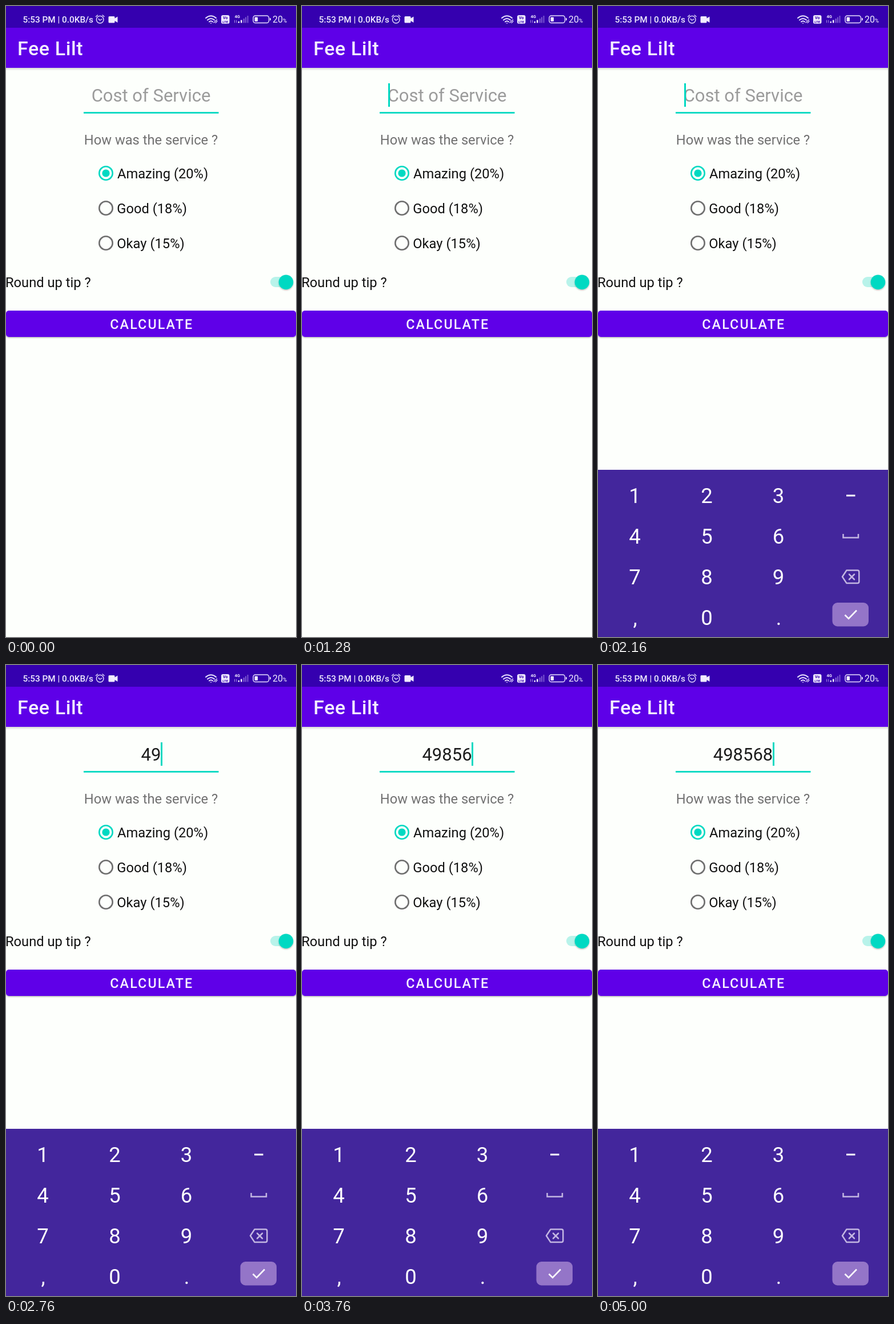
An HTML page that plays this animation: 508x1102 px, repeating every 5040 ms.

```html
<!DOCTYPE html>
<html lang="en">
<head>
<meta charset="utf-8">
<title>Tip calculator</title>
<style>
  :root { --teal: #00d9c2; --violet: #5e00e8; --loop: 5040ms; }
  html, body { margin: 0; width: 100%; height: 100%; overflow: hidden; background: #fdfffc; }
  body { position: relative; font-family: Roboto, sans-serif; }
  svg { position: absolute; left: 0; top: 0; display: block; }
  .label { font-size: 23.7px; fill: #111; }
  .keys { font-size: 36.5px; fill: #fff; text-anchor: middle; }
  .line { fill: none; stroke-linecap: round; stroke-linejoin: round; }

  .field { font-size: 31px; line-height: 40px; white-space: nowrap; }
  .hint, .typed { position: absolute; left: 254px; top: 136.5px; transform: translateX(-50%); }
  .hint { color: #9b9b9b; animation: hint var(--loop) step-end infinite; }
  .typed { color: #1c1c1c; overflow: hidden; animation: type var(--loop) step-end infinite; }
  .caret {
    position: absolute; top: 135px; width: 2.6px; height: 41px; background: var(--teal);
    animation: move var(--loop) step-end infinite, blink var(--loop) step-end infinite;
  }
  .keyboard { animation: slide var(--loop) infinite; }

  @keyframes hint {
    from { visibility: visible; }
    46.03%, to { visibility: hidden; }
  }
  @keyframes type {
    from { width: 0; }
    46.03% { width: 1ch; }
    52.38% { width: 2ch; }
    59.52% { width: 3ch; }
    65.87% { width: 4ch; }
    72.22% { width: 5ch; }
    78.57%, to { width: 6ch; }
  }
  @keyframes move {
    from { left: 151.4px; }
    46.03% { left: calc(253.4px + .5ch); }
    52.38% { left: calc(253.4px + 1ch); }
    59.52% { left: calc(253.4px + 1.5ch); }
    65.87% { left: calc(253.4px + 2ch); }
    72.22% { left: calc(253.4px + 2.5ch); }
    78.57%, to { left: calc(253.4px + 3ch); }
  }
  @keyframes blink {
    from, 27.78%, 88.49% { opacity: 0; }
    18.25%, 37.7%, 98.41%, to { opacity: 1; }
  }
  @keyframes slide {
    from, 26.19% { transform: translateY(292px); animation-timing-function: cubic-bezier(.33, 1, .68, 1); }
    29.76%, to { transform: none; }
  }
</style>
</head>
<body>
<svg width="508" height="1102" viewBox="0 0 508 1102">
  <defs>
    <linearGradient id="shade" x2="0" y2="1">
      <stop stop-color="#000" stop-opacity=".16"/>
      <stop offset="1" stop-color="#000" stop-opacity="0"/>
    </linearGradient>
    <filter id="soft" x="-30%" y="-30%" width="160%" height="160%">
      <feDropShadow dx="0" dy="1.3" stdDeviation="1.3" flood-opacity=".3"/>
    </filter>
  </defs>

  <!-- app bar -->
  <rect y="108" width="508" height="5" fill="url(#shade)"/>
  <rect y="38" width="508" height="70" fill="var(--violet)"/>
  <text x="20" y="86" font-size="34" font-weight="500" letter-spacing=".6" fill="#f5f0ff">Fee Lilt</text>

  <!-- status bar -->
  <rect width="508" height="38" fill="#3500af"/>
  <g fill="#f1ecff">
    <text x="29.5" y="28.7" font-size="15.3" font-weight="500">5:53 PM | 0.0KB/s</text>
    <path d="M181 18h8q1.500 0 1.500 1.500v2l5-3v10.500l-5-3v2q0 1.500-1.500 1.500h-8q-1.500 0-1.500-1.500v-8.500q0-1.500 1.500-1.500z"/>
    <rect x="377" y="16" width="14.500" height="15" rx="3"/>
    <text x="400.500" y="21" font-size="7.500" font-weight="700">4G</text>
    <path d="M406.500 27h2.500v2.500h-2.500zM411 24.500h2.500v5H411z"/>
    <rect x="435.500" y="19.500" width="5.500" height="7.500" rx="1"/>
    <path d="M462 20.500q2 0 2 2.500t-2 2.500z"/>
    <text x="467" y="29" font-size="16">20<tspan font-size="9.500" font-weight="500">%</tspan></text>
  </g>
  <path d="M415.500 22h2.500v7.500h-2.500zM419 19.500h2v10h-2zM422.500 17h2v12.500h-2z" fill="#7a57cf"/>
  <g fill="#3500af" font-size="7" font-weight="700" text-anchor="middle">
    <text x="384.200" y="23">Vo</text>
    <text x="384.200" y="29.700" font-size="6">LTE</text>
  </g>
  <g class="line" stroke="#e9e2ff" stroke-width="1.400">
    <circle cx="164.700" cy="23.700" r="6.300"/>
    <path d="M162 22.500l2.500 2.500 3.500-2M157.500 18.500l3-2.500M172 18.500l-3-2.500"/>
    <path d="M350 21q9-7.500 18 0M353 24.500q6-5 12 0M356 27.500q3-2.500 6 0" stroke-width="2"/>
    <path d="M364 29l5.500-5M367 29.500l3-3M358 30h2" stroke-width="1.200"/>
    <path d="M400.500 29v-4M403.500 25v4" stroke="#a48be0" stroke-width="1"/>
    <rect x="433" y="17" width="27.500" height="12.500" rx="3.800"/>
  </g>

  <!-- form -->
  <rect x="136" y="185" width="236.500" height="2.800" fill="var(--teal)"/>
  <text class="label" x="254" y="241.700" text-anchor="middle" style="fill:#717171">How was the service ?</text>
  <g fill="none" stroke="#6f6f6f" stroke-width="2.600">
    <circle cx="175" cy="292" r="11.700" stroke="var(--teal)"/>
    <circle cx="175" cy="353" r="11.700"/>
    <circle cx="175" cy="414" r="11.700"/>
  </g>
  <circle cx="175" cy="292" r="6.600" fill="var(--teal)"/>
  <g class="label">
    <text x="195" y="300.700">Amazing (20%)</text>
    <text x="194.300" y="361.900">Good (18%)</text>
    <text x="194.300" y="423">Okay (15%)</text>
    <text x="-1" y="491.300">Round up tip ?</text>
  </g>
  <rect x="463" y="473" width="38" height="18" rx="9" fill="#b8f3ea"/>
  <circle cx="490.500" cy="482.300" r="12.800" fill="var(--teal)" filter="url(#soft)"/>
  <rect y="532" width="508" height="46" rx="5" fill="var(--violet)" filter="url(#soft)"/>
  <text x="255.300" y="564.300" text-anchor="middle" font-size="23.300" font-weight="500" letter-spacing="2.080" fill="#f8f4ff">CALCULATE</text>

  <!-- number pad -->
  <g class="keyboard">
    <rect y="810" width="508" height="292" fill="#43269c"/>
    <g class="keys">
      <text x="64.500 190.500 316" y="867.500">123</text>
      <text x="64.500 190.500 316" y="938.700">456</text>
      <text x="64.500 190.500 316" y="1009.700">789</text>
      <text x="65 190.500 316.500" y="1080.700">,0.</text>
    </g>
    <rect x="435" y="853.500" width="15.500" height="3" fill="#fff"/>
    <g class="line" stroke="#c3b6e2" stroke-width="2.500">
      <path d="M429.500 922v6.500h26.500v-6.500" stroke-linecap="butt" stroke-linejoin="miter"/>
      <path d="M435.500 985.500h19q2.800 0 2.800 2.800v17q0 2.800-2.800 2.800h-19l-7.500-11.300z"/>
      <path d="M440 992.500l9 9M449 992.500l-9 9"/>
    </g>
    <rect x="410.500" y="1042" width="63.500" height="41.500" rx="9" fill="#9475c8"/>
    <path d="M432.500 1063.500l6.500 6.500 14-14.500" fill="none" stroke="#fff" stroke-width="2.600"/>
  </g>
</svg>

<div class="field">
  <div class="hint">Cost of Service</div>
  <div class="typed">498568</div>
  <div class="caret"></div>
</div>
</body>
</html>
```
